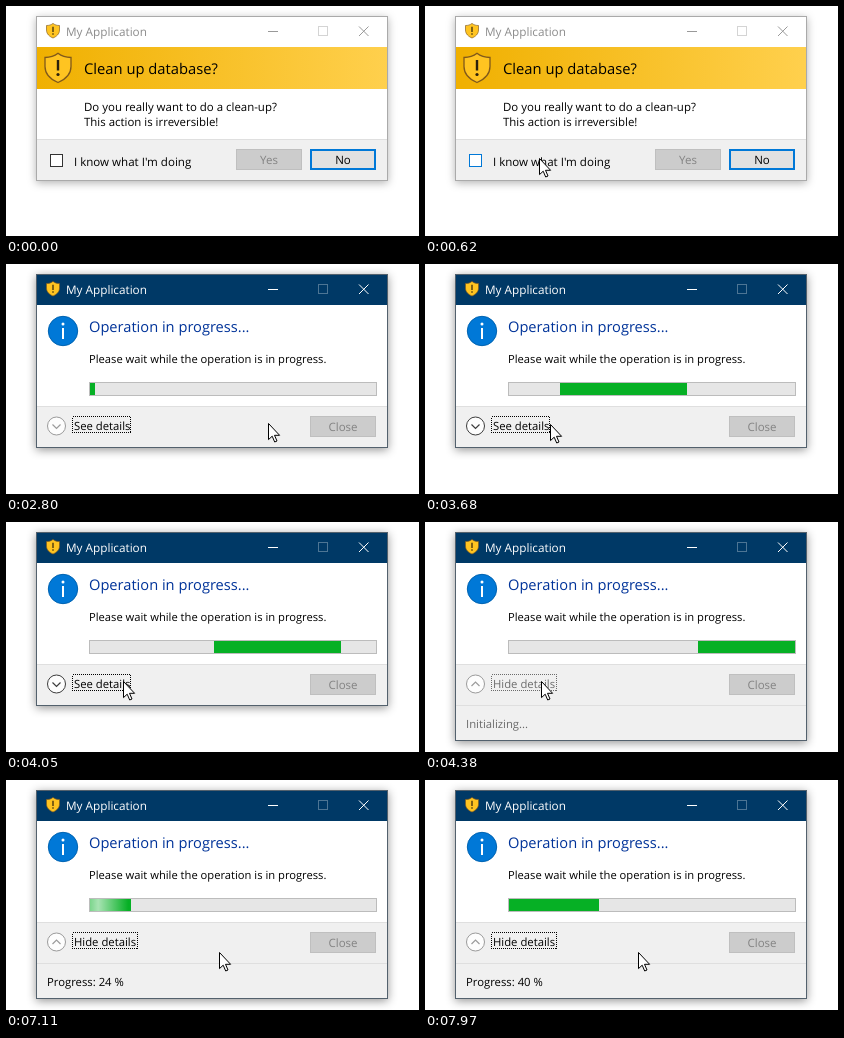
An HTML page for the animation above (8000 ms loop, 413 px wide and 230 px high).

```html
<!DOCTYPE html>
<html lang="en">
<head>
<meta charset="utf-8">
<title>Task dialog</title>
<style>
  html, body { margin: 0; width: 100%; height: 100%; overflow: hidden; background: #fff; }
  svg { display: block; width: 413px; height: 230px; }
  text { font-family: "Open Sans", "Noto Sans", sans-serif; text-rendering: geometricPrecision; }
  .crisp { shape-rendering: crispEdges; }
</style>
</head>
<body>
<svg id="stage" viewBox="0 0 413 230">
  <defs>
    <linearGradient id="gold"><stop stop-color="#f0b000"/><stop offset="1" stop-color="#ffd04d"/></linearGradient>
    <linearGradient id="glow">
      <stop stop-color="#fff" stop-opacity="0"/><stop offset=".5" stop-color="#fff" stop-opacity=".65"/>
      <stop offset="1" stop-color="#fff" stop-opacity="0"/>
    </linearGradient>
    <clipPath id="track"><rect x="84" y="119" width="286" height="12"/></clipPath>
    <clipPath id="filled"><rect id="fillClip" x="84" y="119" width="0" height="12"/></clipPath>
    <g id="shield">
      <path d="M14 .8C18 4 22 5 27 5V14C27 22 21 27 14 30 7 27 1 22 1 14V5C6 5 10 4 14 .8Z" fill="#ffc421" stroke="#80591b" stroke-width="1.3"/>
      <path d="M14 7.5V18" stroke="#2b210c" stroke-width="2.4"/>
      <circle cx="14" cy="22" r="1.6" fill="#2b210c"/>
    </g>
  </defs>
</svg>
<script>
const LOOP = 8000, SWAP = 2770, EXPAND = 4290, COUNT = 5830;
const BLUE = [0, 120, 215];
const stage = document.getElementById('stage');
const fillClip = document.getElementById('fillClip');

function add(parent, tag, attrs, content) {
  const el = document.createElementNS('http://www.w3.org/2000/svg', tag);
  set(el, attrs);
  if (content) el.textContent = content;
  parent.appendChild(el);
  return el;
}
function set(el, attrs) {
  for (const key in attrs) el.setAttribute(key, attrs[key]);
}
const group = parent => add(parent, 'g', {});
const show = (el, on) => set(el, { visibility: on ? 'inherit' : 'hidden' });
const box = (parent, x, y, width, height, fill, more) =>
  add(parent, 'rect', { x, y, width, height, fill, class: 'crisp', ...more });
const label = (parent, x, y, size, content, fill = '#000', more) =>
  add(parent, 'text', { x, y, 'font-size': size, fill, ...more }, content);
const line = (parent, d, stroke, more) =>
  add(parent, 'path', { d, stroke, fill: 'none', ...more });

function button(parent, x, y, caption) {
  const face = box(parent, x + .5, y + .5, 65, 20, '#ccc', { stroke: '#bfbfbf' });
  const text = label(parent, x + 33, y + 15, 11.5, caption, '#838383', { 'text-anchor': 'middle' });
  return { face, text };
}

// Window frame and caption
const frame = box(stage, 30.5, 10.5, 351, 164, '#fff');
const footer = box(stage, 31, 133, 350, 41, '#f0f0f0');
const footerLine = box(stage, 31, 133, 350, 1, '#dfdfdf');
const bar = box(stage, 31, 11, 350, 30, '#fff');
add(stage, 'use', { href: '#shield', transform: 'translate(40 17) scale(.5)' });
const caption = label(stage, 60, 30, 11.75, 'My Application');
const minimize = line(stage, 'M262 25.5H272', '#000', { class: 'crisp' });
const maximize = line(stage, 'M312.5 20.5H321.5V29.5H312.5Z', '#ccc', { class: 'crisp' });
const close = line(stage, 'M353 20.5L362.5 30M362.5 20.5L353 30', '#000');

// Question page
const ask = group(stage);
box(ask, 31, 41, 350, 42, 'url(#gold)');
add(ask, 'use', { href: '#shield', transform: 'translate(38 46.5)' });
label(ask, 78, 68, 14.75, 'Clean up database?');
label(ask, 78, 105, 11.45, 'Do you really want to do a clean-up?');
label(ask, 78, 120, 11.45, 'This action is irreversible!');
const check = box(ask, 44.5, 148.5, 12, 12, '#fff');
const tick = line(ask, 'M46.8 154.6L49.4 157.4 54.4 151.6', '#000', { 'stroke-width': 1.3 });
label(ask, 68, 160, 11.55, "I know what I'm doing");
const yes = button(ask, 230, 143, 'Yes');
const no = button(ask, 304, 143, 'No');
set(no.face, { x: 305, y: 144, width: 64, height: 19, fill: '#e1e1e1', stroke: '#0078d7', 'stroke-width': 2 });
set(no.text, { fill: '#000' });

// Progress page
const work = group(stage);
add(work, 'circle', { cx: 57, cy: 67, r: 14.7, fill: '#0078d7', stroke: '#0063b1' });
box(work, 56, 64, 2, 11, '#fff');
add(work, 'circle', { cx: 57, cy: 60, r: 1.5, fill: '#fff' });
label(work, 83, 68, 14.65, 'Operation in progress...', '#003399');
label(work, 83, 99, 11.2, 'Please wait while the operation is in progress.');
box(work, 83.5, 118.5, 287, 13, '#e6e6e6', { stroke: '#bcbcbc' });
const chunk = box(work, 84, 119, 127, 12, '#06b025', { 'clip-path': 'url(#track)' });
const shineClip = add(work, 'g', { 'clip-path': 'url(#filled)' });
const shine = box(shineClip, 0, 119, 60, 12, 'url(#glow)');
const ring = add(work, 'circle', { cx: 50.5, cy: 162, r: 9, fill: '#fdfdfd' });
const chevron = line(work, '', '#444', { 'stroke-width': 1.2 });
const link = group(work);
const linkText = label(link, 68, 166, 11.3, 'See details');
const focus = box(link, 66.5, 152.5, 58, 16, 'none', { stroke: '#000', 'stroke-dasharray': '1 1' });
const done = button(work, 304, 152, 'Close');
const details = group(work);
box(details, 31, 183, 350, 1, '#dfdfdf');
const status = label(details, 41, 206, 11.3, 'Initializing...');

const cursor = add(stage, 'path', {
  d: 'M.5 .5V16.6L4.2 13.2 6.7 19 9 18 6.5 12.3H11.6Z', fill: '#fff', stroke: '#000', 'stroke-width': 1
});

// time, x, y of the pointer tip
const pointerPath = [
  [200, 296, 236], [620, 114, 152], [1850, 114, 152], [2310, 262, 159], [2850, 262, 159],
  [3450, 125, 160], [3750, 125, 160], [4150, 116, 159], [4500, 116, 159],
  [5050, 159, 167], [5370, 159, 167], [5780, 213, 172]
];
// time, width of the filled part
const fillPath = [[COUNT, 0], [6070, 6], [6810, 34], [7110, 41], [7640, 73], [7970, 90], [8000, 92]];

const ramp = (t, from, to) => Math.min(1, Math.max(0, (t - from) / (to - from)));
const smooth = k => k * k * (3 - 2 * k);
const mix = (a, b, k) => a + (b - a) * k;
const blend = (a, b, k) => `rgb(${a.map((v, i) => Math.round(mix(v, b[i], k)))})`;
const gray = v => [v, v, v];

function sample(path, t, ease = k => k) {
  const next = path.findIndex(p => p[0] > t);
  if (next === 0) return path[0].slice(1);
  if (next < 0) return path[path.length - 1].slice(1);
  const a = path[next - 1], b = path[next];
  const k = ease(ramp(t, a[0], b[0]));
  return a.slice(1).map((v, i) => mix(v, b[i + 1], k));
}

function drawWindow(t) {
  const active = t >= 1080, working = t >= SWAP;
  const bottom = !working ? 175 : t < EXPAND ? 184 : 219;
  const top = working ? 142 : 133;
  set(frame, { height: bottom - 11, stroke: active ? '#53616d' : '#aaa' });
  frame.style.filter = `drop-shadow(0 2px ${active ? 5 : 4}px rgba(0,0,0,${active ? .42 : .3}))`;
  set(footer, { y: top, height: bottom - top - 1 });
  set(footerLine, { y: top });
  set(bar, { fill: active ? '#003966' : '#fff' });
  set(caption, { fill: active ? '#fff' : '#8c8c8c' });
  set(minimize, { stroke: active ? '#fff' : '#999' });
  set(close, { stroke: active ? '#fff' : '#999' });
  set(maximize, { stroke: active ? '#4d7594' : '#d4d4d4' });
}

function drawQuestion(t) {
  const hover = ramp(t, 500, 620) * (1 - ramp(t, 2080, 2250));
  const pressed = t >= 1080 && t < 1240;
  const edge = blend(gray(51), BLUE, hover);
  set(check, { stroke: edge, fill: pressed ? '#cce4f7' : '#fff' });
  set(tick, { stroke: edge, opacity: ramp(t, 1220, 1450) });

  const enabled = ramp(t, 1240, 1560), over = ramp(t, 2210, 2310), down = t >= 2670;
  set(yes.face, {
    fill: down ? '#cce4f7' : over ? blend(gray(225), [229, 241, 251], over) : blend(gray(204), gray(225), enabled),
    stroke: down ? '#005499' : over ? blend(gray(173), BLUE, over) : blend(gray(191), gray(173), enabled)
  });
  set(yes.text, { fill: blend(gray(131), gray(0), enabled) });
}

function drawProgress(t) {
  const open = t >= EXPAND, counting = t >= COUNT;
  const x = counting ? 84 : -44 + ((t - SWAP) * .197) % 429;
  const width = counting ? sample(fillPath, t)[0] : 127;
  set(chunk, { x, width });
  set(fillClip, { width: counting ? width : 0 });
  set(shine, { x: 62 + (t - 7110) * .2 });

  const hot = ramp(t, 3350, 3470) * (1 - ramp(t, EXPAND, EXPAND + 60));
  const ink = blend(gray(155), gray(60), hot);
  set(ring, { stroke: ink });
  set(chevron, { stroke: ink, d: open ? 'M46.5 164L50.5 160 54.5 164' : 'M46.5 160.5L50.5 164.5 54.5 160.5' });

  const reveal = open ? mix(.35, 1, ramp(t, EXPAND, EXPAND + 300)) : 1;
  set(link, { opacity: reveal });
  linkText.textContent = open ? 'Hide details' : 'See details';
  set(focus, { width: open ? 65 : 58 });
  show(details, open);
  set(status, { opacity: reveal });
  status.textContent = counting
    ? `Progress: ${Math.floor((t - 5820) / 53.7)} %`
    : 'Initializing...';
}

function render(t) {
  const working = t >= SWAP;
  show(ask, !working);
  show(work, working);
  drawWindow(t);
  if (working) drawProgress(t); else { show(details, false); drawQuestion(t); }
  const [x, y] = sample(pointerPath, t, smooth);
  set(cursor, { transform: `translate(${Math.round(x)} ${Math.round(y)})` });
}

const start = performance.now();
function tick60() {
  render((performance.now() - start) % LOOP);
  requestAnimationFrame(tick60);
}
tick60();
</script>
</body>
</html>
```
